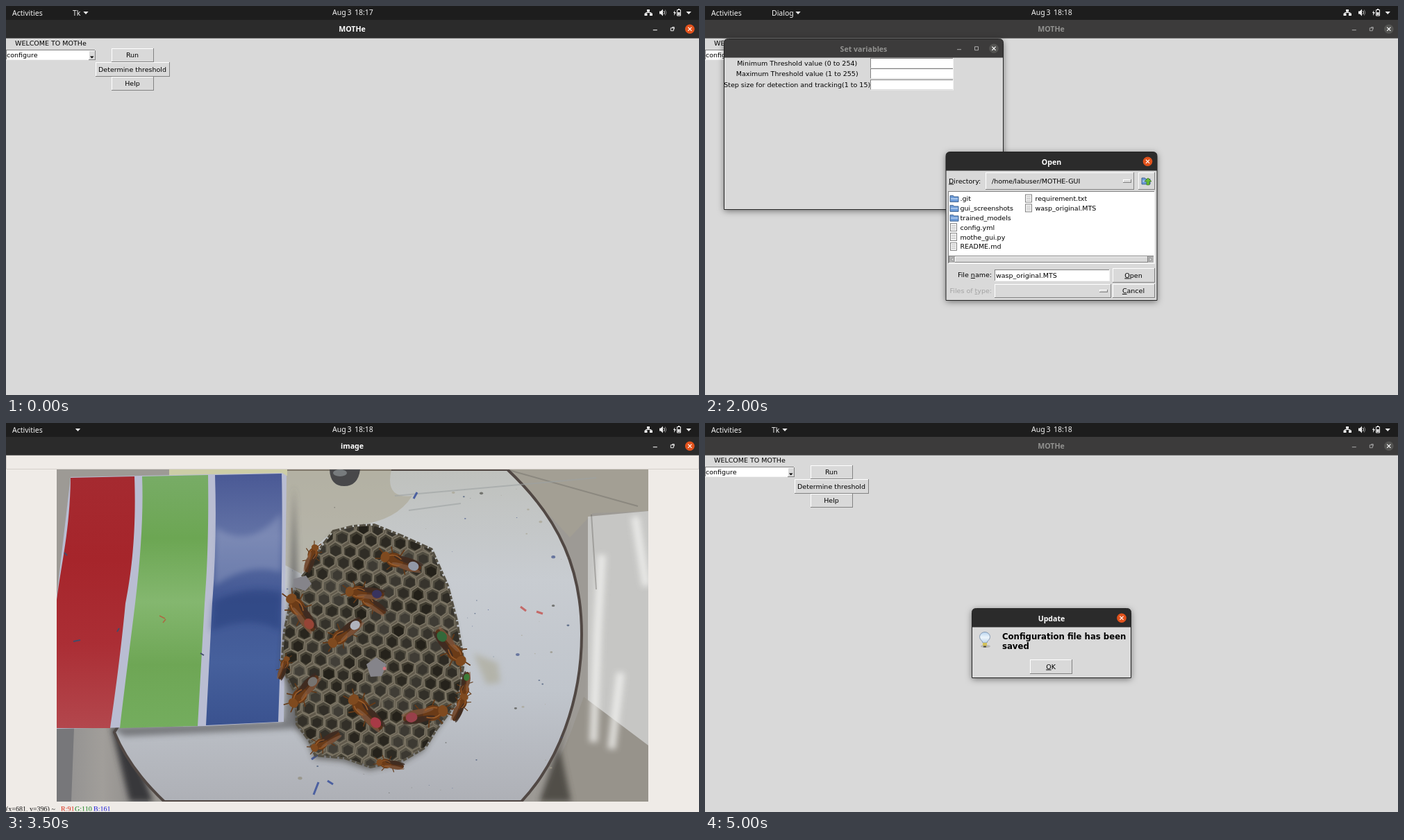
An HTML page that plays this animation: 998 px wide and 561 px high, repeating every 5500 ms.

```html
<!DOCTYPE html>
<html lang="en">
<head>
<meta charset="utf-8">
<title>MOTHe configuration</title>
<style>
html, body { margin: 0; width: 100%; height: 100%; overflow: hidden; background: #d9d9d9; }
svg { display: block; }
#stage { width: 998px; height: 561px; }
text { font: 9.5px "DejaVu Sans", sans-serif; white-space: pre; }
.bar { font: 10.5px "Noto Sans", sans-serif; fill: #f2f2f2; word-spacing: -1px; }
.title { font: bold 10.6px "Noto Sans", sans-serif; }
.message { font: bold 11.69px "DejaVu Sans", sans-serif; }
.readout { font: 10px "Liberation Serif", serif; }
.window { filter: drop-shadow(0 2px 5px rgba(0,0,0,.5)); }
</style>
</head>
<body>
<svg id="stage" viewBox="0 0 998 561"></svg>
<script>
const STEP = 500;
const FACE = '#d9d9d9', PANEL = '#efebe7';
const SOFT = 'filter="url(#soft)"';

const rect = (x, y, w, h, fill, extra = '') =>
  `<rect x="${x}" y="${y}" width="${w}" height="${h}" fill="${fill}" ${extra}/>`;
const path = (d, fill, extra = '') => `<path d="${d}" fill="${fill}" ${extra}/>`;
const line = (d, color, width = 1, extra = '') =>
  path(d, 'none', `stroke="${color}" stroke-width="${width}" ${extra}`);
const circle = (x, y, r, fill) => `<circle cx="${x}" cy="${y}" r="${r}" fill="${fill}"/>`;
const oval = (x, y, rx, ry, fill, extra = '') =>
  `<ellipse cx="${x}" cy="${y}" rx="${rx}" ry="${ry}" fill="${fill}" ${extra}/>`;
const text = (x, y, s, cls = '', anchor = 'start', fill = '') =>
  `<text x="${x}" y="${y}" class="${cls}" text-anchor="${anchor}" ${fill && `style="fill:${fill}"`}>${s}</text>`;
const u = s => `<tspan text-decoration="underline">${s}</tspan>`;

function seeded(seed) {
  return () => (seed = (seed * 16807) % 2147483647) / 2147483647;
}

// Tk widgets
function bevel(x, y, w, h, fill = FACE, sunken = false) {
  const [light, dark] = sunken ? ['#828282', '#f4f4f4'] : ['#ffffff', '#828282'];
  return rect(x, y, w, h, dark) + rect(x, y, w - 1, h - 1, light) + rect(x + 1, y + 1, w - 2, h - 2, fill);
}
const button = (x, y, w, h, label) =>
  bevel(x, y, w, h) + text(x + w / 2 - .5, y + h / 2 + 3, label, '', 'middle');
const entry = (x, y, w, h, value = '') =>
  bevel(x, y, w, h, '#fff', true) + text(x + 2, y + h / 2 + 3.3, value);

// Window frames
function titleButtons(right, y, active, kinds) {
  const ink = active ? '#fff' : '#aaa';
  const x = right - 13.5;
  let out = circle(x, y, 6.8, active ? '#e2521c' : '#545452') +
    line(`M${x - 2.6} ${y - 2.6}l5.2 5.2m0-5.2l-5.2 5.2`, '#fff', 1.2);
  [...kinds].forEach((kind, i) => {
    const bx = x - 25 * (i + 1);
    if (kind === 'm') out += rect(bx - 3, y + 1, 6, 1, ink);
    if (kind === 's') out += line(`M${bx - 2.5} ${y - 2.5}h5v5h-5z`, ink);
    if (kind === 'r') out += line(`M${bx - 2.5} ${y - 1.5}h4v4h-4zM${bx - .5} ${y - 2.7}h3v3`, ink, .9);
  });
  return out;
}
const titleBar = active => active ? '#2b2b2b' : '#3c3b3b';
const titleInk = active => active ? '#fff' : '#929290';

function frame(x, y, w, h, title, active, kinds, body, fill = FACE) {
  const shape = `M${x} ${y + h}V${y + 6}q0-6 6-6h${w - 12}q6 0 6 6v${h - 6}z`;
  const top = `M${x} ${y + 27}V${y + 6}q0-6 6-6h${w - 12}q6 0 6 6v21z`;
  return `<g class="window">${path(shape, fill)}</g>` + path(top, titleBar(active)) +
    line(shape, '#242424') +
    text(x + w / 2, y + 18, title, 'title', 'middle', titleInk(active)) +
    titleButtons(x + w, y + 13.7, active, kinds) + body;
}

function desktop(clock, menu, arrowX) {
  return rect(0, 0, 998, 20, '#1d1d1d') + text(9, 13.8, 'Activities', 'bar') +
    text(96, 13.8, menu, 'bar') + path(`M${arrowX - 3.7} 8h7.4l-3.7 4z`, '#f2f2f2') +
    text(470, 13.3, 'Aug 3', 'bar') + text(502, 13.3, clock, 'bar') +
    rect(923, 5, 4, 3.5, '#f2f2f2') + rect(919.5, 10.5, 4, 3.5, '#f2f2f2') + rect(927, 10.5, 4, 3.5, '#f2f2f2') +
    line('M925 8v1.5M921.5 11V9.5h7.5V11', '#f2f2f2') +
    path('M941 7.5h2l3-3v10l-3-3h-2z', '#f2f2f2') +
    line('M947.5 7q2 2.5 0 5', '#f2f2f2') + line('M949.3 5.5q3 4 0 8', '#8a8a8a') +
    line('M966.5 5.5h5v8.5h-5zM968 4.5h2', '#f2f2f2') + rect(967.5, 9, 3, 4, '#f2f2f2') +
    path('M963.5 6l-2.5 4h1.5l-.5 4 3-5h-2z', '#f2f2f2') +
    path('M979.5 8h7.4l-3.7 4z', '#f2f2f2');
}
const mainBar = (title, active) => rect(0, 20, 998, 26.6, titleBar(active)) +
  text(498.5, 37.3, title, 'title', 'middle', titleInk(active)) + titleButtons(998.3, 33.2, active, 'rm');

const mainWindow = active => rect(0, 46, 998, 515, FACE) + mainBar('MOTHe', active) +
  text(13, 57, 'WELCOME TO MOTHe') + entry(0, 63, 129, 15) + text(1, 73.8, 'configure') +
  bevel(119, 64, 10, 14) + path('M121 72.5h5.5l-2.75 3z', '#000') +
  button(152, 61, 61, 20, 'Run') + button(129, 81, 107, 21, 'Determine threshold') +
  button(152, 102, 61, 20, 'Help');

function variables(active, entryX, values = ['', '', ''], ready = false) {
  let body = '';
  if (entryX) {
    ['Minimum Threshold value (0 to 254)', 'Maximum Threshold value (1 to 255)',
      'Step size for detection and tracking(1 to 15)'].forEach((label, i) => {
      const y = 75 + Math.round(i * 15.4);
      body += text(132.7, y + 10.5, label, '', 'middle') + entry(entryX, y, 120, 15.5, values[i]);
    });
  }
  if (ready) body += button(238, 121, 166, 20, 'GENERATE CONFIGURATION FILE');
  return frame(27.5, 47.5, 402, 246, 'Set variables', active, 'sm', body);
}

function notice(title, x, w, lines) {
  const bx = x + 18.5;
  const bulb = oval(bx + 1, 322, 7, 2, '#b4b4b4') +
    path(`M${bx - 3} 317c0-3-4.5-4-4.5-8.5a7.5 7 0 0 1 15 0c0 4.5-4.5 5.5-4.5 8.5z`,
      'url(#glass)', 'stroke="#7189a8" stroke-width=".8"') +
    rect(bx - 3, 317, 6, 4.5, '#d3c25a') + rect(bx - 2, 321.5, 4, 2, '#4d4b40');
  return frame(x, 267.5, w, 100, title, true, '', bulb +
    lines.map((s, i) => text(x + 43.5, 311.7 + i * 14, s, 'message')).join('') +
    button(468, 341, 61, 21, u('O') + 'K'));
}

const folder = (x, y) => path(`M${x} ${y + 10}V${y + 1}h4.5l1 1.5h6.5v7.5z`, '#6d9bd8', 'stroke="#2d517f" stroke-width=".8"') +
  rect(x + 1, y + 4.5, 10, 2, '#a9c7ec');
const sheet = (x, y) => rect(x + .5, y - .5, 9, 11, '#f6f6f6', 'stroke="#777" stroke-width=".9"') +
  line(`M${x + 2} ${y + 2.5}h6m-6 2.5h6m-6 2.5h6`, '#aaa', .8);

function browser(title, chooseFile) {
  const names = ['.git', 'gui_screenshots', 'trained_models'];
  if (chooseFile) names.push('config.yml', 'mothe_gui.py', 'README.md', 'requirement.txt', 'wasp_original.MTS');
  const list = names.map((name, i) => {
    const x = i < 6 ? 353 : 461, y = 277.5 + (i % 6) * 13.88;
    return (i < 3 ? folder(x, y - 5) : sheet(x, y - 5)) + text(x + 14.5, y + 3.5, name);
  }).join('');
  let body = text(351, 255.5, u('D') + 'irectory:') + bevel(404, 240, 214, 25) +
    text(413, 255.5, '/home/labuser/MOTHE-GUI') + bevel(602, 250, 12, 5) + bevel(624, 240, 24, 25) +
    folder(629, 247) + path('M638 248l5 5h-3v5h-4v-5h-3z', '#67bc35', 'stroke="#397718" stroke-width=".7"') +
    bevel(350, 267, 298, 105, '#fff', true) + list + bevel(351, 360, 296, 11, '#b3b3b3', true) +
    bevel(360, 361, 278, 9) + path('M358 362.5v6l-4-3zM640 362.5v6l4-3z', FACE, 'stroke="#888" stroke-width=".8"');
  if (chooseFile) {
    body += text(413, 391, `File ${u('n')}ame:`, '', 'end') + entry(417, 380, 166, 17, 'wasp_original.MTS') +
      button(587, 378, 61, 21, u('O') + 'pen') + text(413, 414, `Files of ${u('t')}ype:`, '', 'end', '#a3a3a3') +
      bevel(417, 401, 168, 20) + bevel(568, 409, 12, 4);
  } else {
    body += text(413, 391, u('S') + 'election:', '', 'end') +
      entry(417, 380, 166, 17, '/home/labuser/MOTHE-GUI') + button(587, 378, 61, 21, u('O') + 'K');
  }
  return frame(347, 210.5, 304, 214, title, true, '', body + button(587, 401, 61, 20, u('C') + 'ancel'));
}

// Photograph
function specks(random) {
  let out = '';
  const inks = ['#394c85', '#4a4943', '#a6a18f', '#8d8974', '#31466b'];
  for (let i = 0; i < 90; i++) {
    const x = 405 + random() * 405, y = 85 + random() * 455, r = .4 + random() ** 3 * 2;
    out += oval(x, y, r * 1.4, r, inks[i % 5], 'opacity=".65"');
  }
  return out;
}
function comb(random) {
  let out = '';
  for (let row = 0; row < 21; row++) for (let col = 0; col < 15; col++) {
    const x = 367 + col * 21 + (row % 2) * 10.5 + row * 1.1, y = 137 + row * 18 + col * 2;
    const hex = r => 'M' + [0, 1, 2, 3, 4, 5].map(i => {
      const a = (i + .5) * Math.PI / 3;
      const reach = r * (.9 + random() * .2);
      return `${(x + reach * Math.cos(a)).toFixed(1)} ${(y + reach * Math.sin(a)).toFixed(1)}`;
    }).join('L') + 'z';
    const shade = 34 + random() * 32;
    out += path(hex(10.8), `rgb(${shade + 26},${shade + 22},${shade + 10})`, 'stroke="#7d7666" stroke-width="1.5"') +
      path(hex(7.6), `rgb(${shade},${shade - 3},${shade - 10})`, 'transform="translate(.5 1)"');
  }
  return out;
}
function wasp([x, y, angle, size, mark]) {
  return `<g transform="translate(${x} ${y}) rotate(${angle}) scale(${size})">` +
    line('M-9-4l-5-9M-2-4l3-10M5 3l5 9M-5 4l-6 9M-18-2l-8-5M-18 2l-9 3', '#633918', 1.3) +
    oval(10, 0, 15, 7, '#57321a') + oval(-6, 0, 10, 8, '#6b3b17') + oval(-17, 0, 5, 6, '#7f4a1f') +
    oval(9, -4, 17, 3.2, '#3b2a22', 'opacity=".8"') + oval(9, 4, 17, 2.8, '#8a6248', 'opacity=".6"') +
    line('M-13-3q6-4 14 0M-12 4q6 3 13 0', '#9a5c2a', 1.2) + (mark ? oval(16, 0, 6, 5, mark) : '') + '</g>';
}
function photo() {
  const random = seeded(71);
  const plate = 'M722 67C800 140 829 215 829 305C829 400 795 490 742 546H228C192 512 170 480 156 446L400 67Z';
  const outline = 'M472 157L500 150L530 148L570 164L612 183L635 235L648 285L658 345L650 400L619 441L603 467L572 485L525 495L488 482L446 478L438 458L420 434L418 390L398 350L402 300L413 250L426 224L441 205L456 178Z';
  const wasps = [
    [440, 194, 110, .9], [567, 200, 18, 1.3, '#9298a6'], [424, 272, 55, 1.35, '#964436'],
    [526, 260, 35, 1], [515, 245, 5, 1.2, '#38335f'], [487, 304, -38, 1.25, '#b0b2bc'],
    [641, 325, 232, 1.35, '#33683a'], [661, 380, 280, .85, '#3d7a38'], [654, 409, 115, .9],
    [606, 420, 168, 1.4, '#98404a'], [517, 416, 46, 1.4, '#a83a46'], [428, 388, -48, 1.25, '#777471'],
    [400, 352, 110, .75], [459, 460, -30, 1], [552, 492, 10, .85]];
  return `<g clip-path="url(#photoClip)">` + rect(73, 67, 852, 479, '#9d9a95') +
    path('M73 440H160L205 546H73z', 'url(#table)') +
    path('M98 440L94 546H73V440z', '#77777a') + path('M152 440L172 440L212 546H178z', '#39383a', SOFT) +
    path('M722 67h203v60l-80 3-33 35z', '#a39f94') +
    path('M838 135L925 127V475L838 440z', '#c6c6c4') +
    path('M832 395L925 465V546H770L812 450z', '#97938b') +
    path('M808 430L798 470L814 546H768z', '#3f3c38', `opacity=".8" ${SOFT}`) +
    line('M858 190L852 300L846 460M906 135L922 235M885 360L872 470', '#f4f4f2', 12, `opacity=".75" ${SOFT}`) +
    line('M721 67L910 120M843 132L850 240', '#66645f', 2, 'opacity=".4"') +
    path(plate, 'url(#plate)', 'stroke="#514844" stroke-width="4"') +
    path('M402 67H555Q545 110 585 105Q560 145 495 148Q440 165 426 218L402 205z', '#aaa58e', 'opacity=".55"') +
    path('M466 67h44q-3 24-23 24t-21-24z', '#48484a') + oval(481, 72, 10, 5, '#777b7d') +
    line('M560 105L850 79M580 126L655 116', '#9da2a2', 2, 'opacity=".6"') + specks(random) +
    line('M587 109l5-9M440 485l11-8M443 536l7-18M463 516l8 5', '#4c60a0', 3) +
    line('M741 265l8 6M764 272l9 3', '#c46a68', 3) +
    path('M673 332l35 14 4 28-20 3z', '#aaa793', `opacity=".6" ${SOFT}`) +
    rect(235, 67, 170, 9, '#cdcda7') +
    path('M150 438L400 430L415 90L428 440L170 452z', '#4c4b4e', `opacity=".6" ${SOFT}`) +
    path('M93 78L398 72L404 76L400 431L288 437L73 441V250z', '#b9bdd2') +
    path('M93 79L185 77C188 160 180 220 172 260C166 325 156 400 150 440H73V255C80 200 92 155 93 79z', 'url(#red)') +
    path('M196 77L291 75C292 155 290 210 286 260L276 437L164 440C171 380 180 310 186 260Q199 150 196 77z', 'url(#green)') +
    path('M301 75L397 73C399 150 396 260 396 315L392 431L288 436L297 260Q304 170 301 75z', 'url(#blue)') +
    path('M299 258Q348 232 396 244V300Q351 275 295 300z', '#223a78', `opacity=".45" ${SOFT}`) +
    path('M302 150Q350 185 396 130V215Q350 200 300 235z', '#a0abcb', `opacity=".4" ${SOFT}`) +
    line('M97 315l10-2M84 187l4 4M160 301l3-5M280 332l5 3', '#424c69', 2) + line('M221 278l8 4M226 288l4-5', '#ad6942', 1.5) +
    path(outline, '#37352f', `${SOFT} opacity=".6" transform="translate(-2 6)"`) +
    path(outline, '#615a4c', 'stroke="#555044" stroke-width="6" stroke-dasharray="9 2 5 3"') +
    `<clipPath id="combClip">${path(outline, '#000')}</clipPath><g clip-path="url(#combClip)">${comb(random)}</g>` +
    path('M414 225l18-5 8 12-9 10-16-5zM519 348l14-10 15 10-7 17-16 1z', '#85848a') +
    wasps.map(wasp).join('') + circle(545, 354, 2.5, '#cf747d') + '</g>';
}

const gradient = (id, stops, dir = 'x2="0" y2="1"') => `<linearGradient id="${id}" ${dir}>` +
  stops.map((c, i) => `<stop offset="${i / (stops.length - 1)}" stop-color="${c}"/>`).join('') + '</linearGradient>';
const defs = `<defs>
  ${gradient('red', ['#a52a30', '#a6252b', '#ab2e35', '#b3474d'])}
  ${gradient('green', ['#78ac66', '#6ca653', '#84b76f', '#6ea655', '#74ad5e'])}
  ${gradient('blue', ['#4a5995', '#6373a6', '#405693', '#46609c', '#3a528f'])}
  ${gradient('plate', ['#bfc1bd', '#c8ccd1', '#c0c5cc', '#aeb0b6'])}
  ${gradient('table', ['#8f8e8e', '#a19e9a', '#8a8886'], 'x2="1" y2="0"')}
  ${gradient('glass', ['#b8d4ef', '#edf5fb', '#bcd3e8'])}
  <filter id="soft" x="-30%" y="-30%" width="160%" height="160%"><feGaussianBlur stdDeviation="4"/></filter>
  <clipPath id="photoClip">${rect(73, 67, 852, 479, '#000')}</clipPath>
  <g id="photo">${photo()}</g></defs>`;

const readout = (items, xs) => `<svg width="300" height="559.5">` +
  items.map((s, i) => text(xs[i], 560, s, 'readout', 'start', ['#111', '#d92b16', '#118019', '#1818d9'][i])).join('') + '</svg>';
const viewer = (active, items, xs) => rect(0, 46, 998, 515, PANEL) + mainBar('image', active) +
  line('M.5 47V66.5H997.5V47', '#d5d0cb') + '<use href="#photo"/>' + readout(items, xs);
const selection = line('M391.5 235.5h71.5v65h-71.5z', '#16dc16', 1.5);
const roi = frame(60.5, 80.5, 270, 170, 'ROI', true, 'm',
  line('M61 127.5H330', '#d5d0cb') +
  '<svg x="137" y="128" width="118" height="108" viewBox="391 235 72 66" preserveAspectRatio="none"><use href="#photo"/></svg>', PANEL);

const early = (menu, x) => desktop('18:17', menu, x);
const late = (menu, x) => desktop('18:18', menu, x);
const narrow = variables(false, 238);
const scenes = [
  early('Tk', 115) + mainWindow(true),
  early('Tk', 115) + mainWindow(false) + variables(false) + browser('Choose Directory', false),
  early('TkChooseDir', 166) + mainWindow(false) + variables(false) +
    notice('Status', 381.5, 235, ['succesfully set path as', '[/home/labuser/MOTHE-GUI]']),
  late('Dialog', 134) + mainWindow(false) + narrow + notice('Update', 384.5, 229, ['Please select a video', 'file']),
  late('Dialog', 134) + mainWindow(false) + narrow + browser('Open', true),
  late('TkFDialog', 152) + mainWindow(false) + narrow + notice('Status', 384.5, 229, ['succesfully selected', 'video file']),
  late('Tk', 115) + mainWindow(false) + variables(true, 261, ['150', '250', '10'], true),
  late('', 103.5) + viewer(true, ['(x=681, y=396) ~', 'R:91', 'G:110', 'B:161'], [0, 79, 99, 126]),
  late('', 103.5) + viewer(true, ['(x=879, y=527) ~', 'R:98', 'G:92', 'B:80'], [0, 79, 99, 121]) + selection,
  late('', 103.5) + viewer(false, ['(x=1262, y=561) ~', 'R:152', 'G:159', 'B:154'], [0, 84, 109, 137]) + selection + roi,
  late('Tk', 115) + mainWindow(false) + notice('Update', 384.5, 229, ['Configuration file has been', 'saved'])
];

const stage = document.getElementById('stage');
stage.innerHTML = defs + scenes.map(s => `<g class="scene" display="none">${s}</g>`).join('');
const layers = [...stage.querySelectorAll('.scene')];
const start = performance.now();

function update(now) {
  const current = Math.floor(Math.max(0, now - start) / STEP) % layers.length;
  layers.forEach((layer, i) => layer.setAttribute('display', i === current ? 'inline' : 'none'));
  requestAnimationFrame(update);
}
update(start);
</script>
</body>
</html>
```
